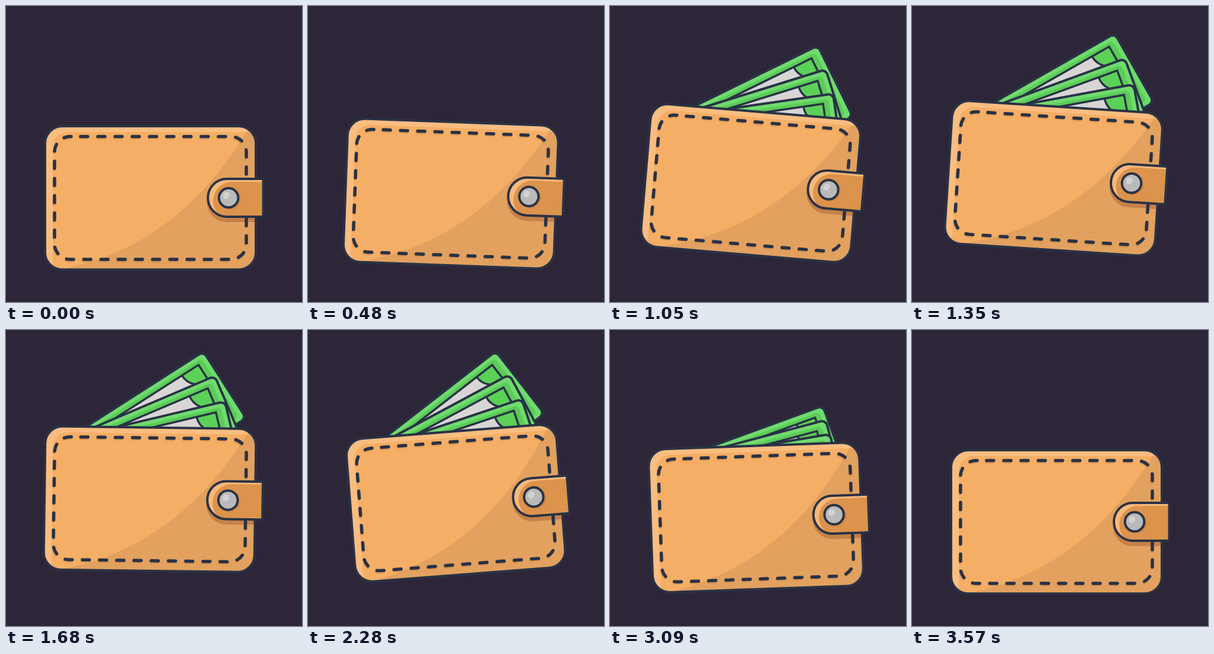
Write an HTML page with a canvas that moves like this. It is 500 px wide and 500 px high and loops after 3600 ms.

```html
<!DOCTYPE html>
<html lang="en">
<head>
<meta charset="utf-8">
<title>Wallet</title>
<style>
  html, body { margin: 0; width: 100%; height: 100%; overflow: hidden; background: #2d2638; }
  canvas { display: block; width: 100vmin; height: 100vmin; }
</style>
</head>
<body>
<canvas id="stage" width="500" height="500"></canvas>
<script>
const ctx = document.getElementById('stage').getContext('2d');
const LOOP = 3600;
const INK = '#293246';
const BILL = { x: 0, y: -1.5, right: 273.5, bottom: 132 };
const PIVOT = { x: 103.6, y: 225.3 };
const FAN = [
  { angle: 33.4, slide: 0 },
  { angle: 23.8, slide: -2.5 },
  { angle: 14.1, slide: 0 },
];
const rad = deg => deg * Math.PI / 180;

// Timing curve with flat ends; x1 and x2 set how long each end lingers.
function ease(x, x1 = 1 / 3, x2 = 2 / 3) {
  if (x <= 0) return 0;
  if (x >= 1) return 1;
  let lo = 0, hi = 1;
  for (let i = 0; i < 24; i++) {
    const s = (lo + hi) / 2, r = 1 - s;
    if (3 * r * r * s * x1 + 3 * r * s * s * x2 + s * s * s < x) lo = s;
    else hi = s;
  }
  return lo * lo * (3 - 2 * lo);
}

function track(keys, t) {
  let i = 1;
  while (i < keys.length - 1 && t > keys[i][0]) i++;
  const [t0, v0] = keys[i - 1], [t1, v1] = keys[i];
  return v0 + (v1 - v0) * ease((t - t0) / (t1 - t0));
}

const lift = t => track([[0, 0], [1800, -38.7], [LOOP, 0]], t);
const tilt = t => track([[0, 0], [1050, 4.85], [2460, -4.85], [LOOP, 0]], t);
const spread = t => ease((t - 360) / 1023, 0.33, 0.2) - ease((t - 2540) / 836, 0.8, 0.67);

function box(left, top, right, bottom, radii) {
  const path = new Path2D();
  path.roundRect(left, top, right - left, bottom - top, radii);
  return path;
}

function disc(x, y, r) {
  const path = new Path2D();
  path.arc(x, y, r, 0, Math.PI * 2);
  return path;
}

function fill(path, color) {
  ctx.fillStyle = color;
  ctx.fill(path);
}

function stroke(path, width, color = INK) {
  ctx.lineWidth = width;
  ctx.strokeStyle = color;
  ctx.stroke(path);
}

function clipped(path, draw) {
  ctx.save();
  ctx.clip(path);
  draw();
  ctx.restore();
}

function shifted(dx, dy, draw) {
  ctx.save();
  ctx.translate(dx, dy);
  draw();
  ctx.restore();
}

const billShape = box(BILL.x, BILL.y, BILL.right, BILL.bottom, 9);
const billShade = box(BILL.x + 9, BILL.y + 8, BILL.right - 9, BILL.bottom - 8, 7);
const billPanel = box(BILL.x + 19, BILL.y + 14.5, BILL.right - 19, BILL.bottom - 14.5, 0);
const billCorner = disc(BILL.right - 19, BILL.y + 14.5, 33.5);

function drawBill(angle, slide) {
  ctx.save();
  ctx.translate(PIVOT.x, PIVOT.y);
  ctx.rotate(rad(-angle));
  ctx.translate(slide, 0);
  fill(billShape, '#70db6d');
  fill(billShade, '#5acc57');
  fill(billPanel, '#d7d6d4');
  clipped(billPanel, () => {
    fill(billCorner, '#5cd157');
    stroke(billCorner, 3.5);
  });
  stroke(billPanel, 3.5);
  stroke(billShape, 4);
  ctx.restore();
}

const body = box(66, 203, 422, 445.2, 29);
const bodyFace = box(79, 213, 440, 460, 24);
const bodyShade = new Path2D('M412 203Q293 407 92 445H430V203Z');
const tab = box(341, 292, 434.5, 356, [32, 3, 3, 32]);

// Starts inside the top edge so that the dashes fall evenly around the seam.
const seam = new Path2D('M126 220.5H380A26 26 0 0 1 406 246.5V402A26 26 0 0 1 380 428' +
  'H108A26 26 0 0 1 82 402V246.5A26 26 0 0 1 108 220.5H126');
const SEAM_LENGTH = 2 * (272 + 155.5) + 52 * Math.PI;

function drawBody() {
  fill(body, '#fabd80');
  clipped(body, () => {
    fill(bodyFace, '#f4ae65');
    fill(bodyShade, 'rgba(0,0,0,.075)');
    shifted(0, 7.5, () => {
      fill(tab, '#c58149');
      stroke(tab, 3, '#c58149');
    });
  });
  stroke(body, 4);
}

function drawSeam() {
  ctx.save();
  ctx.lineCap = 'round';
  ctx.setLineDash([12, SEAM_LENGTH / 35 - 12]);
  shifted(-1, 2.5, () => stroke(seam, 5, 'rgba(190,112,52,.3)'));
  stroke(seam, 5.5);
  ctx.restore();
}

function drawTab() {
  fill(tab, '#f8b97b');
  clipped(tab, () => shifted(9, 5, () => fill(tab, '#dc934c')));
  stroke(tab, 4);

  fill(disc(378.5, 326, 18), 'rgba(180,100,45,.25)');
  const button = disc(376, 324, 16.3);
  fill(button, '#bababa');
  ctx.fillStyle = '#d2d2d2';
  ctx.beginPath();
  ctx.ellipse(372, 320, 5.2, 6, 0.5, 0, Math.PI * 2);
  ctx.fill();
  stroke(button, 4);
}

function render(t) {
  ctx.fillStyle = '#2d2638';
  ctx.fillRect(0, 0, 500, 500);
  ctx.save();
  ctx.translate(250, 250 + lift(t));
  ctx.rotate(rad(tilt(t)));
  ctx.translate(-250, -250);
  const open = spread(t);
  for (const { angle, slide } of FAN) drawBill(angle * open, slide);
  drawBody();
  drawSeam();
  drawTab();
  ctx.restore();
}

const start = performance.now();
function frame() {
  render((performance.now() - start) % LOOP);
  requestAnimationFrame(frame);
}
frame();
</script>
</body>
</html>
```
